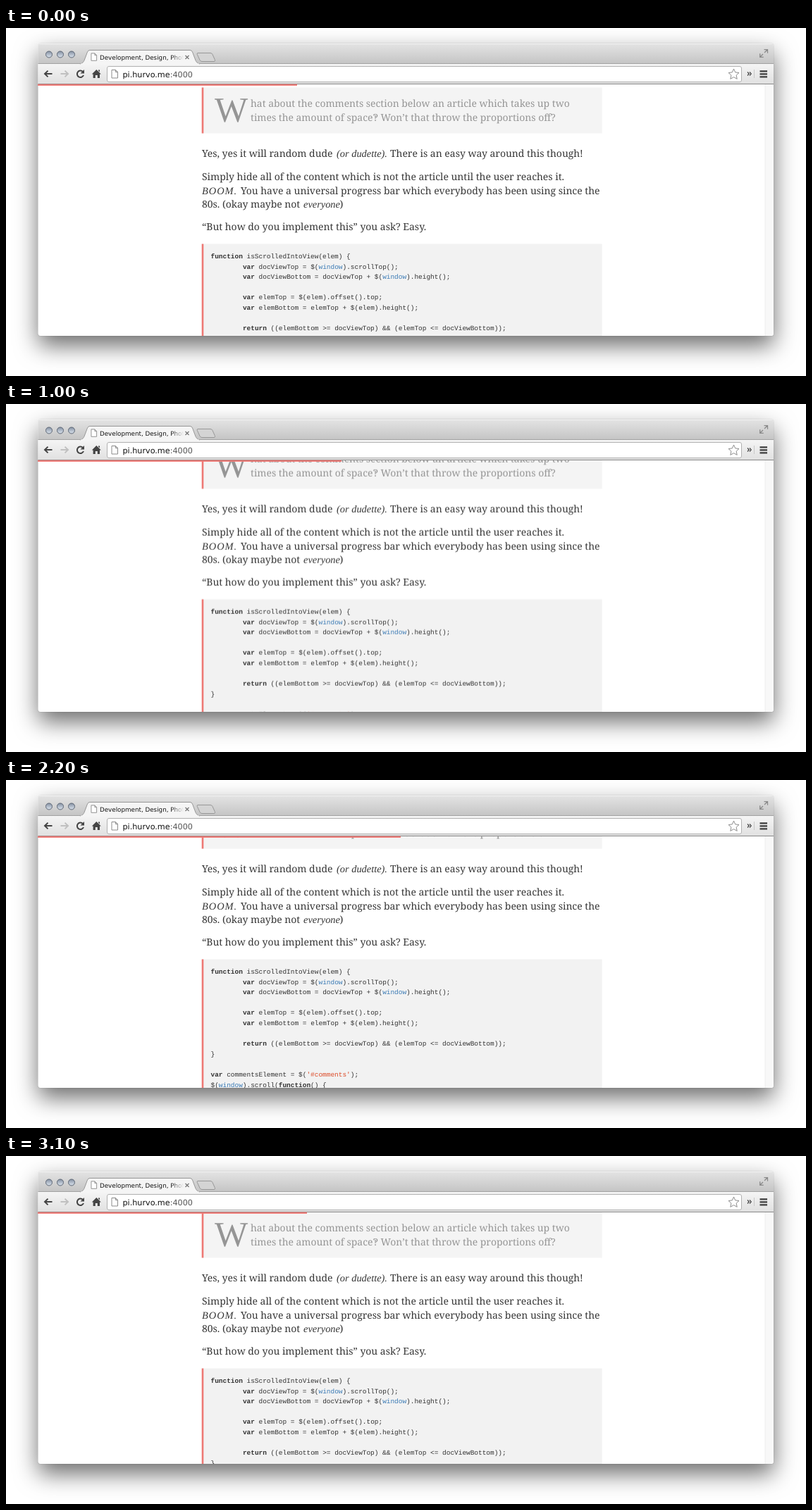
Recreate the animation shown at these times as an HTML page. Size 1135x494 px, loop 3.2 s.

```html
<!DOCTYPE html>
<html lang="en">
<head>
<meta charset="utf-8">
<title>Reading progress bar</title>
<style>
  html, body { margin: 0; width: 100%; height: 100%; overflow: hidden; background: #fff; }
  .shadow {
    position: absolute; left: 45.5px; top: 22px; width: 1043.5px; height: 415px;
    border-radius: 4px 4px 3px 3px;
    box-shadow: 0 0 1px rgba(0,0,0,.5), 0 14px 33px rgba(0,0,0,.58);
  }
  svg { position: absolute; left: 0; top: 0; display: block; }
  text { white-space: pre; text-rendering: geometricPrecision; }
  .ui { font-family: "DejaVu Sans", sans-serif; fill: #111; }
  .body { font: 13.95px "Noto Serif", serif; fill: #363636; }
  .quote { font-size: 13.9px; fill: #959595; }
  .cap { font: 50px "Liberation Serif", serif; }
  .it { font: italic 14.4px "Liberation Serif", serif; }
  .code { font: 9.45px "Liberation Mono", monospace; fill: #333; }
  .kw { font-weight: bold; }
  .obj { fill: #3a7ab5; }
  .str { fill: #dc4b28; }
  .accent { fill: #ee7874; }

  .scroll { animation: scroll 3.2s infinite; }
  .progress { animation: progress 3.2s infinite; }

  /* Held rests, then ten scroll ticks per second */
  @keyframes scroll {
    0%      { transform: translateY(0); animation-timing-function: step-end; }
    15.625% { transform: translateY(-3.25px); animation-timing-function: steps(5); }
    31.25%  { transform: translateY(-29.25px); animation-timing-function: steps(4); }
    43.75%  { transform: translateY(-45.5px); animation-timing-function: steps(3); }
    53.125% { transform: translateY(-55.25px); animation-timing-function: step-end; }
    68.75%  { transform: translateY(-52px); animation-timing-function: steps(4); }
    81.25%  { transform: translateY(-31px); animation-timing-function: steps(5); }
    96.875%, 100% { transform: translateY(-5px); animation-timing-function: step-end; }
  }
  /* The bar trails the page on the way down */
  @keyframes progress {
    0%      { transform: translateX(0); animation-timing-function: step-end; }
    15.625% { transform: translateX(1px); animation-timing-function: steps(5); }
    31.25%  { transform: translateX(63px); animation-timing-function: steps(4); }
    43.75%  { transform: translateX(118px); animation-timing-function: steps(3); }
    53.125% { transform: translateX(157px); animation-timing-function: step-end; }
    68.75%  { transform: translateX(147px); animation-timing-function: steps(4); }
    81.25%  { transform: translateX(88px); animation-timing-function: steps(5); }
    96.875%, 100% { transform: translateX(14px); animation-timing-function: step-end; }
  }
</style>
</head>
<body>
<div class="shadow"></div>
<svg width="1135" height="494" viewBox="0 0 1135 494">
  <defs>
    <linearGradient id="title" x2="0" y2="1">
      <stop stop-color="#e4e4e4"/><stop offset="1" stop-color="#c4c4c4"/>
    </linearGradient>
    <linearGradient id="tools" x2="0" y2="1">
      <stop stop-color="#f5f5f5"/><stop offset="1" stop-color="#e0e0e0"/>
    </linearGradient>
    <linearGradient id="bead" x2="0" y2="1">
      <stop stop-color="#8490a2"/><stop offset="1" stop-color="#dde6f0"/>
    </linearGradient>
    <linearGradient id="fade" gradientUnits="userSpaceOnUse" x1="234" x2="252">
      <stop stop-color="#111"/><stop offset="1" stop-color="#111" stop-opacity="0"/>
    </linearGradient>
    <clipPath id="frame"><rect x="45.5" y="22" width="1043.5" height="415" rx="4"/></clipPath>
    <clipPath id="view"><rect x="45.5" y="80" width="1043.5" height="357"/></clipPath>
    <circle id="light" cy="37.5" r="4.5" fill="url(#bead)" stroke="#5d6674"/>
    <path id="sheet" d="M.5 .5h5.5l3 3v8.5h-8.5zM6 .5v3h3" fill="#fff" stroke="#8a8a8a"/>
    <path id="arrow" d="M12 5H2M6 .6L1.5 5L6 9.4" fill="none" stroke-width="2"/>
  </defs>

  <g clip-path="url(#frame)">
    <rect x="45" y="22" width="1045" height="416" fill="#fff"/>

    <g clip-path="url(#view)">
      <rect x="1077" y="80" width="12" height="357" fill="#f8f8f8"/>
      <path d="M1077 80v357" stroke="#ececec"/>

      <g class="scroll">
        <rect x="277.7" y="84.5" width="568" height="65" fill="#f4f4f4"/>
        <rect class="accent" x="277.7" y="84.5" width="2.6" height="65"/>
        <g class="body quote">
          <text class="cap" x="296" y="133">W</text>
          <text x="347" y="112">hat about the comments section below an article which takes up two</text>
          <text x="347" y="131.5">times the amount of space‽ Won’t that throw the proportions off?</text>
        </g>

        <g class="body">
          <text y="183"><tspan x="278">Yes, yes it will random dude</tspan><tspan class="it" x="469">(or dudette).</tspan><tspan x="545">There is an easy way around this though!</tspan></text>
          <text x="278" y="216">Simply hide all of the content which is not the article until the user reaches it.</text>
          <text y="235.5"><tspan class="it" x="278" letter-spacing="1">BOOM.</tspan><tspan x="333">You have a universal progress bar which everybody has been using since the</tspan></text>
          <text y="255"><tspan x="278">80s. (okay maybe not</tspan><tspan class="it" x="422">everyone</tspan><tspan x="473.5">)</tspan></text>
          <text x="278" y="287.3">“But how do you implement this” you ask? Easy.</text>
        </g>

        <rect x="277.7" y="306.5" width="568" height="220" fill="#f2f2f2"/>
        <rect class="accent" x="277.7" y="306.5" width="2.6" height="220"/>
        <g class="code">
          <text x="290.5" y="327"><tspan class="kw">function</tspan> isScrolledIntoView(elem) {</text>
          <text x="335.9" y="341.6"><tspan class="kw">var</tspan> docViewTop = $(<tspan class="obj">window</tspan>).scrollTop();</text>
          <text x="335.9" y="356.2"><tspan class="kw">var</tspan> docViewBottom = docViewTop + $(<tspan class="obj">window</tspan>).height();</text>
          <text x="335.9" y="385.4"><tspan class="kw">var</tspan> elemTop = $(elem).offset().top;</text>
          <text x="335.9" y="400"><tspan class="kw">var</tspan> elemBottom = elemTop + $(elem).height();</text>
          <text x="335.9" y="429.2"><tspan class="kw">return</tspan> ((elemBottom &gt;= docViewTop) &amp;&amp; (elemTop &lt;= docViewBottom));</text>
          <text x="290.5" y="443.8">}</text>
          <text x="290.5" y="473"><tspan class="kw">var</tspan> commentsElement = $(<tspan class="str">'#comments'</tspan>);</text>
          <text x="290.5" y="487.6">$(<tspan class="obj">window</tspan>).scroll(<tspan class="kw">function</tspan>() {</text>
        </g>
      </g>
    </g>

    <!-- Title bar and tab -->
    <rect x="45" y="22" width="1045" height="29" fill="url(#title)"/>
    <path d="M46 22.5h1043" stroke="#f4f4f4"/>
    <rect x="45" y="50.5" width="1045" height="29.5" fill="url(#tools)"/>
    <path d="M45 50.5H1090" stroke="#a2a2a2"/>
    <path d="M105 51C109 50 110 48 111 46L115.5 34Q116.5 31.5 119 31.5H261Q263.5 31.5 264.5 34L269 46C270 48 271 50 275 51" fill="#f5f5f5" stroke="#979797"/>
    <path d="M106 51.3H274" stroke="#f5f5f5" stroke-width="1.5"/>
    <path d="M272 35.5H290Q292 35.5 293 37.5L296.5 45.5Q297 47.5 295 47.5H278Q276 47.5 275 45.5L271.3 37.5Q270.7 35.5 272 35.5Z" fill="#d4d4d4" stroke="#989898"/>
    <use href="#light" x="61"/><use href="#light" x="77"/><use href="#light" x="93"/>
    <use href="#sheet" transform="translate(120.5 35.5) scale(.9)"/>
    <text class="ui" x="133" y="45" font-size="8.75" style="fill:url(#fade)">Development, Design, Phot</text>
    <path d="M254.5 39l5 5m0-5l-5 5" stroke="#777" stroke-width="1.3"/>
    <path d="M1076 35l4-4M1075.5 30.7h5v5M1074 37l-4 4M1069.7 36.3v5h5" fill="none" stroke="#8a8a8a" stroke-width="1.3"/>

    <!-- Toolbar -->
    <use href="#arrow" x="53.5" y="60" stroke="#444"/>
    <use href="#arrow" transform="matrix(-1 0 0 1 89.5 60)" stroke="#c0c0c0"/>
    <path d="M109 62A4.7 4.7 0 1 0 110 67" fill="none" stroke="#444" stroke-width="2"/>
    <path d="M111 59v5.5h-5.5z" fill="#444"/>
    <path d="M128.3 59l6.5 6.5h-1.8v5.5h-3.2v-4h-3v4h-3.2v-5.5h-1.8zM131 59.5h2v3l-2-2z" fill="#444"/>
    <rect x="143.5" y="54.5" width="900" height="22" rx="2.5" fill="#fff" stroke="#b0b0b0"/>
    <use href="#sheet" x="149.5" y="59"/>
    <text class="ui" x="165.5" y="69.5" font-size="11.2">pi.hurvo.me<tspan fill="#555">:4000</tspan></text>
    <path d="M1032.5 58l2.2 4.9 5.3.6-3.9 3.6 1.1 5.2-4.7-2.6-4.7 2.6 1.1-5.2-3.9-3.6 5.3-.6z" fill="#fff" stroke="#8c8c8c" stroke-linejoin="round"/>
    <path d="M1052 62.5l2.2 2.5-2.2 2.5M1055 62.5l2.2 2.5-2.2 2.5" fill="none" stroke="#444" stroke-width="1.2"/>
    <path d="M1061.5 59v12" stroke="#c8c8c8"/>
    <path d="M1069.5 61.3h10.5m-10.5 4h10.5m-10.5 4h10.5" stroke="#3c3c3c" stroke-width="2.2"/>
    <path d="M45 79.5H1090" stroke="#888"/>

    <rect class="accent progress" x="-387" y="79.7" width="800" height="2.2"/>
  </g>
</svg>
</body>
</html>
```
